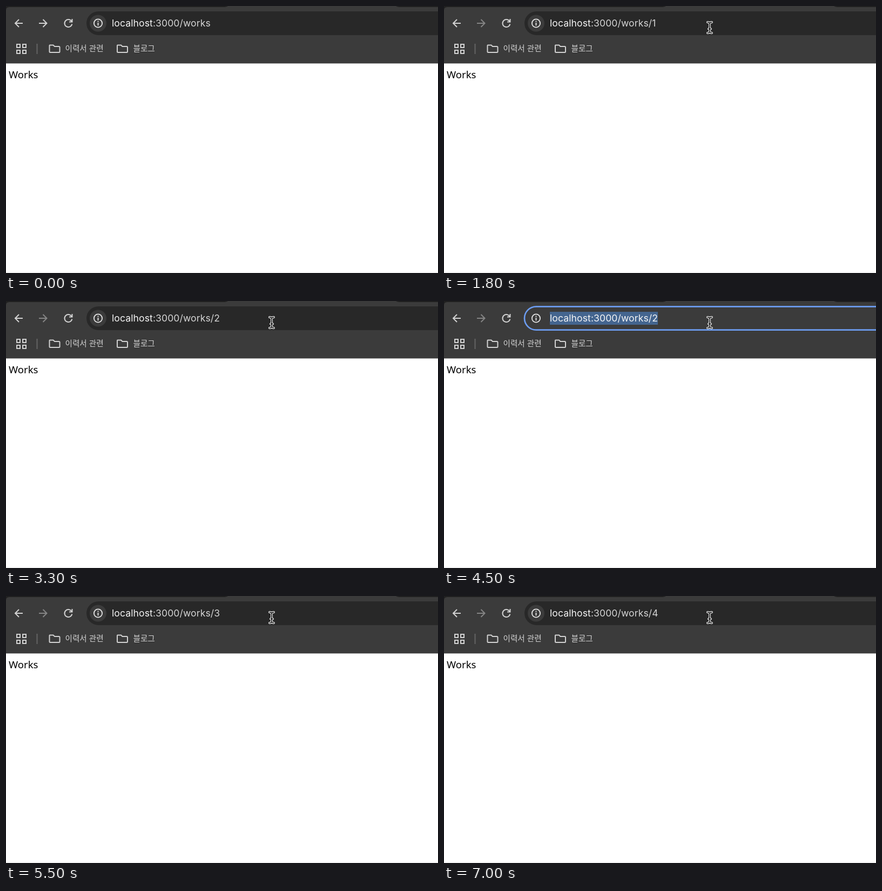
An HTML page for the animation above (7700 ms loop, 800 by 495 pixels).

```html
<!DOCTYPE html>
<html lang="ko">
<head>
<meta charset="utf-8">
<style>
  html, body { margin: 0; width: 100%; height: 100%; overflow: hidden; background: #fff; }
  svg { display: block; width: 800px; height: 495px; }
  text { font: 17.6px Inter, "Noto Sans CJK KR", "Noto Sans CJK", sans-serif; letter-spacing: .08px; fill: #f5f5f5; white-space: pre; }
  .bookmark { font: 14.6px "Noto Sans CJK KR", "Noto Sans CJK", sans-serif; letter-spacing: 0; fill: #d2d2d2; }
  .page { font: 18.5px "Noto Sans", sans-serif; letter-spacing: 0; fill: #000; }
  .link { fill: #a8c7fa; }
  .bold { font-weight: 700; letter-spacing: .32px; }
  .soft { fill: #c7c7c7; }
  .dash { word-spacing: 1.4px; }
  .line { fill: none; stroke: #d2d2d2; stroke-width: 2; }
  .panel { fill: #3b3b3b; filter: drop-shadow(0 8px 7.5px rgba(0, 0, 0, .5)); }
</style>
</head>
<body>
<svg viewBox="0 0 800 495">
  <defs>
    <path id="globe" fill="#c7c7c7" fill-rule="evenodd" d="M-8.500 0a8.500 8.500 0 1 1 17 0a8.500 8.500 0 1 1-17 0Z
      M-.8 6.700Q-6.800 5.500-6.800 0L-6.600-1.500-2.500 2.500v.9q0 1.700 1.700 1.700Z
      M5 4.600q-.3-1.200-1.600-1.200h-.9v-2.500q0-.9-.9-.9h-5v-1.700h1.700q.9 0 .9-.9v-1.700h1.700q1.700 0 1.700-1.700v-.3c2.500 1 4.300 3.400 4.300 6.300q0 2.700-1.900 4.600Z"/>
    <g id="search" fill="none" stroke="#c7c7c7" stroke-width="1.8">
      <circle cx="-1.7" cy="-1.7" r="4.6"/><path d="M2 2L7 7"/>
    </g>
    <circle id="app" r="9.5" fill="#58c4dc"/>
    <path id="folder" class="line" d="M1 1H7.5L10 3.5H18Q19.5 3.5 19.5 5V13Q19.5 14.5 18 14.5H2Q.5 14.5.5 13V2Q.5 1 1 1Z"/>
    <path id="arrow" d="M0 0V18L4.2 14.2 7.2 21.5 10.6 20 7.6 13H13Z" fill="#000" stroke="#fff" stroke-width="1.5"/>
    <path id="beam" d="M-4-10Q-.8-10 0-8Q.8-10 4-10M0-8V8M-4 10Q-.8 10 0 8Q.8 10 4 10M-2 2.500H2"/>
    <g id="ibeam" fill="none" stroke-linecap="round">
      <use href="#beam" stroke="#fff" stroke-width="3.8"/>
      <use href="#beam" stroke="#000" stroke-width="1.5"/>
    </g>
  </defs>

  <rect width="800" height="106" fill="#202020"/>
  <path d="M0 106.500V8Q0 2 6 2H402Q408 2 411 0H722Q725 2 731 2H800V106.500Z" fill="#3b3b3b"/>
  <path d="M31 32H17M24 25l-7 7 7 7" class="line"/>
  <path id="forward" d="M61 32H75M68.500 25l7 7-7 7" class="line"/>
  <path d="M121.500 28.500A7 7 0 1 0 122.300 33.500M122.500 24V29.500H117" class="line"/>
  <path d="M20 71h6v6h-6zM31 71h6v6h-6zM20 82h6v6h-6zM31 82h6v6h-6z" class="line"/>
  <path d="M57.500 70V89" stroke="#656565" stroke-width="2"/>
  <use href="#folder" x="80" y="71.500"/>
  <text x="109.500" y="84" class="bookmark">이력서 관련</text>
  <use href="#folder" x="205.500" y="71.500"/>
  <text x="235.500" y="84" class="bookmark">블로그</text>
  <text x="5" y="134" class="page">Works</text>
  <path d="M0 494H800" stroke="#e4e4e4"/>

  <g id="bar">
    <rect id="field" x="149" width="700"/>
    <circle id="badge" cx="170.500" cy="32" r="15.500" fill="#3b3b3b"/>
    <circle cx="170.500" cy="32" r="7.600" fill="none" stroke="#e6e6e6" stroke-width="1.800"/>
    <path d="M170.500 31V36.200M170.500 27.500V29.500" stroke="#e6e6e6" stroke-width="1.900"/>
  </g>
  <g id="list"></g>
  <rect id="selection" x="196" y="20" height="24" fill="#44658f"/>
  <text id="url" y="38"><tspan>localhost</tspan><tspan id="path"></tspan></text>
  <path id="caret" stroke="#fff" stroke-width="1.300"/>
  <use id="mouse"/>
</svg>
<script>
const LOOP = 7700, HOST = 'localhost:3000/works/';
const $ = id => document.getElementById(id);
const set = (id, attrs) => Object.entries(attrs).forEach(([k, v]) => $(id).setAttribute(k, v));
const show = (id, on) => set(id, { visibility: on ? 'visible' : 'hidden' });

// [start, mode, path, suggestions]: digits are visited pages, "?" is web search
const steps = [
  [0, 'idle', ''],
  [800, 'select', ''], [1000, 'edit', ''],
  [1300, 'open', '/', '?'], [1500, 'open', '/1', '?'], [1700, 'idle', '/1'],
  [2300, 'select', '/1'], [2500, 'edit', '/1'],
  [2800, 'open', '/', '2?1'], [3000, 'open', '/2', '?'], [3200, 'idle', '/2'],
  [4500, 'select', '/2'], [4600, 'edit', '/2'],
  [4800, 'open', '/', '2?1'], [5000, 'open', '/3', '?'], [5200, 'idle', '/3'],
  [6000, 'select', '/3'], [6300, 'edit', '/3'],
  [6500, 'open', '/', '12?3'], [6700, 'open', '/4', '?'], [6800, 'idle', '/4']
];

function row(icon, y, content) {
  return `<use href="#${icon}" x="179.5" y="${y}"/><text x="213" y="${y + 6.3}">${content}</text>`;
}

function dropdown(path, items) {
  const typed = HOST + path.slice(1);
  const bottom = 123 + 51.3 * items.length;
  const rows = [...items].map((item, i) => {
    const y = 137.3 + 51.3 * i;
    return item === '?'
      ? row('search', y, `${typed}<tspan class="soft"> - Ozubel 검색</tspan>`)
      : row('app', y, `React App<tspan class="soft dash"> - </tspan><tspan class="link bold">${HOST}</tspan><tspan class="link">${item}</tspan>`);
  });
  return `<path class="panel" d="M820 8H140.500V${bottom - 20}q0 20 20 20H820Z"/>
    <rect x="140.500" y="60" width="660" height="51.5" fill="#525252"/>
    <path d="M140.500 60h2.500q3 0 3 3v45.500q0 3-3 3h-2.500Z" fill="#669df6"/>
    <use href="#globe" x="179.5" y="32"/>
    ${row('globe', 86, `<tspan class="link bold">${typed}</tspan>`)}${rows.join('')}`;
}

function drawStep([, mode, path, items]) {
  const idle = mode === 'idle', open = mode === 'open';
  $('list').innerHTML = open ? dropdown(path, items) : '';
  show('bar', !open);
  set('field', idle
    ? { y: 10, height: 44, rx: 22, fill: '#282828', stroke: 'none' }
    : { y: 10.3, height: 43.4, rx: 21.7, fill: '#3b3b3b', stroke: '#6c9cf0', 'stroke-width': 2.7 });
  set('badge', { opacity: +idle });
  set('forward', { style: path ? 'stroke:#858585' : '' });

  const x = open ? 213 : 196;
  set('url', { x });
  $('path').textContent = ':3000/works' + path;
  set('path', { style: idle ? 'fill:#d4d4d4' : '' });
  const width = $('url').getComputedTextLength();
  set('selection', { width });
  show('selection', mode === 'select');
  set('caret', { d: `M${x + width + .5} 21V43` });
  show('caret', open || mode === 'edit');
}

function drawMouse(t, open) {
  const p = Math.min(1, Math.floor((t - 300) / 100) / 4);
  const rest = (1 - p) ** 2;
  const x = 492 + 90 * rest, y = 40 + 424 * rest;
  const arrow = open || y > 56;
  show('mouse', t >= 300);
  set('mouse', { href: arrow ? '#arrow' : '#ibeam', x: open ? 491 : x, y: open ? 38.5 : y });
}

let current;
function frame(now) {
  const t = now % LOOP;
  const step = steps.findLast(s => s[0] <= t);
  if (step !== current) drawStep(current = step);
  drawMouse(t, step[1] === 'open');
  requestAnimationFrame(frame);
}
frame(0);
</script>
</body>
</html>
```
